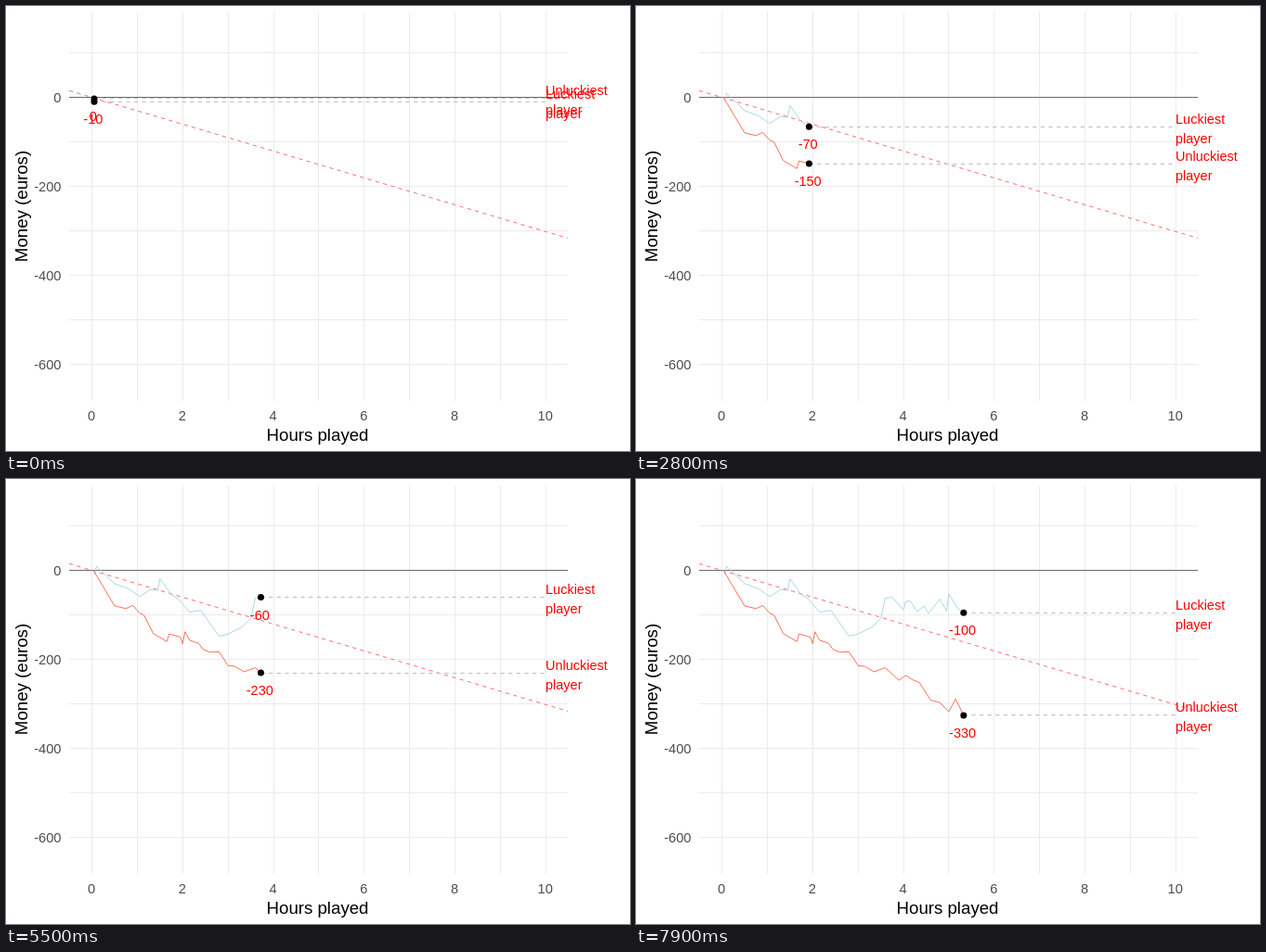
Recreate the animation shown at these times as an HTML page. Size 672 by 480 pixels, loop 8 s.

```html
<!DOCTYPE html>
<html lang="en">
<head>
<meta charset="utf-8">
<title>Money over hours played</title>
<style>
  html, body { margin: 0; width: 100%; height: 100%; overflow: hidden; background: #fff; }
  svg { display: block; width: 672px; height: 480px; font: 14.67px "Liberation Sans", Arial, sans-serif; }
  path, polyline { fill: none; stroke-width: 1; }
  .grid { stroke: #ebebeb; shape-rendering: crispEdges; }
  .zero { stroke: #6b6b6b; shape-rendering: crispEdges; }
  .trend { stroke: #ff6f6f; stroke-dasharray: 4.3; }
  .guide { stroke: #bebebe; stroke-dasharray: 4.3; }
  .tick { fill: #4d4d4d; }
  .title { font-size: 18.67px; text-anchor: middle; }
  .label { fill: #f00; font-size: 14.5px; }
</style>
</head>
<body>
<svg id="chart" viewBox="0 0 672 480"></svg>
<script>
const LOOP = 8000, STEP = 100;
const SAMPLE = 0.05;                 // hours per round
const FRAME_HOURS = 9.95 / 149;      // hours revealed per step
const PANEL = { left: 68, right: 605, top: 7, bottom: 426 };

const toX = hours => 92.55 + hours * 48.87;
const toY = money => 98.5 - money * 0.48;
const roundX = round => toX((round + 1) * SAMPLE);
const pixel = v => Math.floor(v) + 0.5;

// Turning points of each player's run: [round, money lost].
const players = [
  { name: 'Luckiest', color: '#add8e6', turns: [
    [0, 10], [1, -9], [9, 30], [15, 41], [20, 59], [25, 43], [28, 45], [29, 19],
    [34, 55], [37, 64], [42, 94], [47, 90], [55, 148], [59, 143], [65, 128], [69, 108],
    [71, 63], [74, 60], [79, 89], [80, 70], [82, 69], [85, 93], [88, 80], [90, 97],
    [95, 65], [98, 92], [99, 53], [103, 86], [106, 97]] },
  { name: 'Unluckiest', color: '#ff6f59', turns: [
    [0, 3], [9, 80], [14, 86], [17, 79], [20, 96], [22, 101], [26, 142], [32, 160],
    [33, 143], [38, 150], [39, 165], [40, 138], [42, 157], [46, 164], [48, 178], [51, 184],
    [55, 183], [59, 214], [62, 216], [66, 228], [71, 219], [77, 247], [80, 236], [83, 246],
    [86, 252], [91, 292], [95, 297], [99, 318], [102, 289], [106, 331]] }
];

const chart = document.getElementById('chart');

function set(el, attrs) {
  for (const key in attrs) el.setAttribute(key, attrs[key]);
}

function add(tag, attrs, text = '') {
  const el = document.createElementNS('http://www.w3.org/2000/svg', tag);
  set(el, attrs);
  el.textContent = text;
  return chart.appendChild(el);
}

function drawAxes() {
  let grid = '';
  for (let h = 0; h <= 10; h++) grid += `M${pixel(toX(h))} ${PANEL.top}V${PANEL.bottom}`;
  for (let m = 100; m >= -600; m -= 100) grid += `M${PANEL.left} ${pixel(toY(m))}H${PANEL.right}`;
  add('path', { class: 'grid', d: grid });

  for (let h = 0; h <= 10; h += 2)
    add('text', { class: 'tick', x: toX(h) - 0.5, y: 447, 'text-anchor': 'middle' }, h);
  for (let m = 0; m >= -600; m -= 200)
    add('text', { class: 'tick', x: 59.5, y: toY(m) + 5.5, 'text-anchor': 'end' }, m);

  add('text', { class: 'title', x: 335.5, y: 469 }, 'Hours played');
  add('text', { class: 'title', transform: 'translate(23 216) rotate(-90)' }, 'Money (euros)');
  add('path', { class: 'zero', d: `M${PANEL.left} ${toY(0)}H${PANEL.right}` });
  add('path', { class: 'trend', d: `M${PANEL.left} ${toY(15)}L${PANEL.right} ${toY(-316.5)}` });
}

// Layers go line, guide, dot, text, each across both players.
function buildPlayers() {
  for (const p of players) p.line = add('polyline', { stroke: p.color });
  for (const p of players) p.guide = add('path', { class: 'guide' });
  for (const p of players) p.dot = add('circle', { r: 3.5 });
  for (const p of players) p.amount = add('text', { class: 'label', 'text-anchor': 'middle' });
  for (const p of players) {
    p.top = add('text', { class: 'label', x: 581 }, p.name);
    p.bottom = add('text', { class: 'label', x: 581 }, 'player');
  }
}

function drawPlayer(p, round) {
  const next = p.turns.findIndex(([r]) => r > round);
  const [r0, loss0] = p.turns[next - 1];
  const [r1, loss1] = p.turns[next];
  const loss = loss0 + (loss1 - loss0) * (round - r0) / (r1 - r0);
  const x = roundX(round), y = toY(-loss);

  const shown = [...p.turns.slice(0, next), [round, loss]];
  set(p.line, { points: shown.map(([r, l]) => `${roundX(r)},${toY(-l)}`).join(' ') });
  set(p.guide, { d: `M${x} ${pixel(y)}H581` });
  set(p.dot, { cx: x, cy: y });
  set(p.amount, { x: x - 1.2, y: y + 24 });
  p.amount.textContent = String(Math.round(-loss / 10) * 10);
  set(p.top, { y: y - 3.5 });
  set(p.bottom, { y: y + 17.5 });
}

let start;
function tick(now) {
  start ??= now;
  const step = Math.floor(((now - start) % LOOP) / STEP);
  for (const p of players) drawPlayer(p, step * FRAME_HOURS / SAMPLE);
  requestAnimationFrame(tick);
}

drawAxes();
buildPlayers();
requestAnimationFrame(tick);
</script>
</body>
</html>
```
